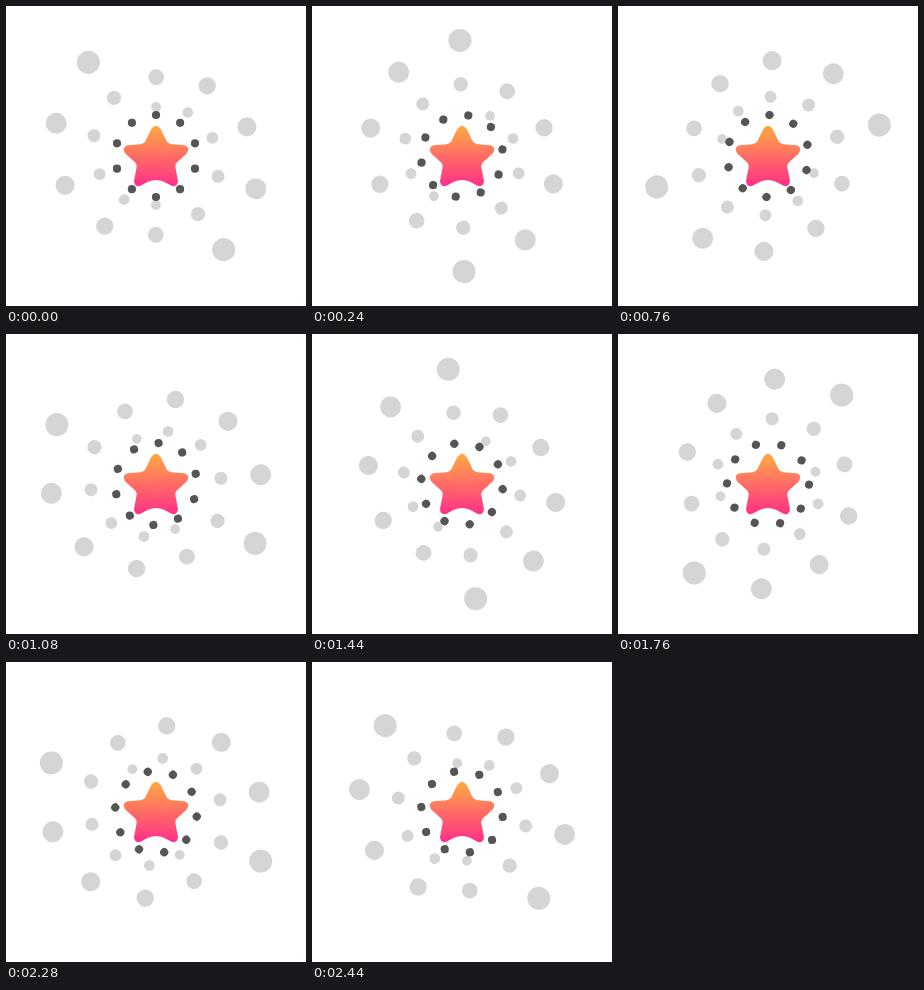
Recreate the animation shown at these times as an HTML page. Size 300 by 300 pixels, loop 2.48 s.

```html
<!DOCTYPE html>
<html>
<head>
<meta charset="utf-8">
<style>
  html, body { margin: 0; width: 100%; height: 100%; overflow: hidden; background: #fff; }
  svg { display: block; width: 100vw; height: 100vh; }
</style>
</head>
<body>
<svg viewBox="-150 -150 300 300">
  <defs>
    <linearGradient id="glow" x1="0" y1="0" x2="0" y2="1">
      <stop offset="0" stop-color="#ffaa42"/>
      <stop offset="1" stop-color="#ff3088"/>
    </linearGradient>
  </defs>
  <g id="spiral" fill="#d5d5d5"></g>
  <g id="ring" fill="#555"></g>
  <path fill="url(#glow)" d="M-4.7-27Q0-33.5 4.7-27L10.5-15Q12-12 15.5-11.7L28.5-10.8Q34.5-9 31-2.7L20.8 6.5
    Q19 8.5 19.4 11.5L22 25Q21.5 31.5 15.5 29.8L8 25.8Q0 22.4-8 25.8L-15.5 29.8Q-21.5 31.5-22 25L-19.4 11.5
    Q-19 8.5-20.8 6.5L-31-2.7Q-34.5-9-28.5-10.8L-15.5-11.7Q-12-12-10.5-15Z"/>
</svg>
<script>
const LOOP = 2480;
const spiral = document.getElementById('spiral');
const ring = document.getElementById('ring');

function addDot(group, degrees, distance, radius) {
  const dot = document.createElementNS('http://www.w3.org/2000/svg', 'circle');
  const a = degrees * Math.PI / 180;
  dot.setAttribute('cx', distance * Math.sin(a));
  dot.setAttribute('cy', -distance * Math.cos(a));
  dot.setAttribute('r', radius);
  group.append(dot);
}

// Two logarithmic arms around an even ring.
for (let k = 0; k < 10; k++) {
  const distance = 49 * 1.1 ** k;
  for (const arm of [0, 180]) addDot(spiral, arm + 36 * k, distance, distance / 10);
  addDot(ring, 36 * k, 41, 4.1);
}

// Accelerating turn of the ring: [ms, degrees]
const turn = [[0, 0], [440, 17.3], [760, 38], [1080, 75.5], [1440, 133], [2080, 268], [2440, 348.7], [LOOP, 360]];

const slope = (i, j) => (turn[j][1] - turn[i][1]) / (turn[j][0] - turn[i][0]);
const tangent = i => slope(Math.max(i - 1, 0), Math.min(i + 1, turn.length - 1));

function ringAngle(t) {
  let i = 0;
  while (t >= turn[i + 1][0]) i++;
  const [t0, a0] = turn[i], [t1, a1] = turn[i + 1];
  const span = t1 - t0, u = (t - t0) / span, v = 1 - u;
  return a0 * v * v * (1 + 2 * u) + a1 * u * u * (1 + 2 * v)
    + span * u * v * (v * tangent(i) - u * tangent(i + 1));
}

const start = performance.now();
function draw() {
  const t = (performance.now() - start) % LOOP;
  spiral.setAttribute('transform', `rotate(${360 * t / LOOP})`);
  ring.setAttribute('transform', `rotate(${ringAngle(t)})`);
  requestAnimationFrame(draw);
}
draw();
</script>
</body>
</html>
```
